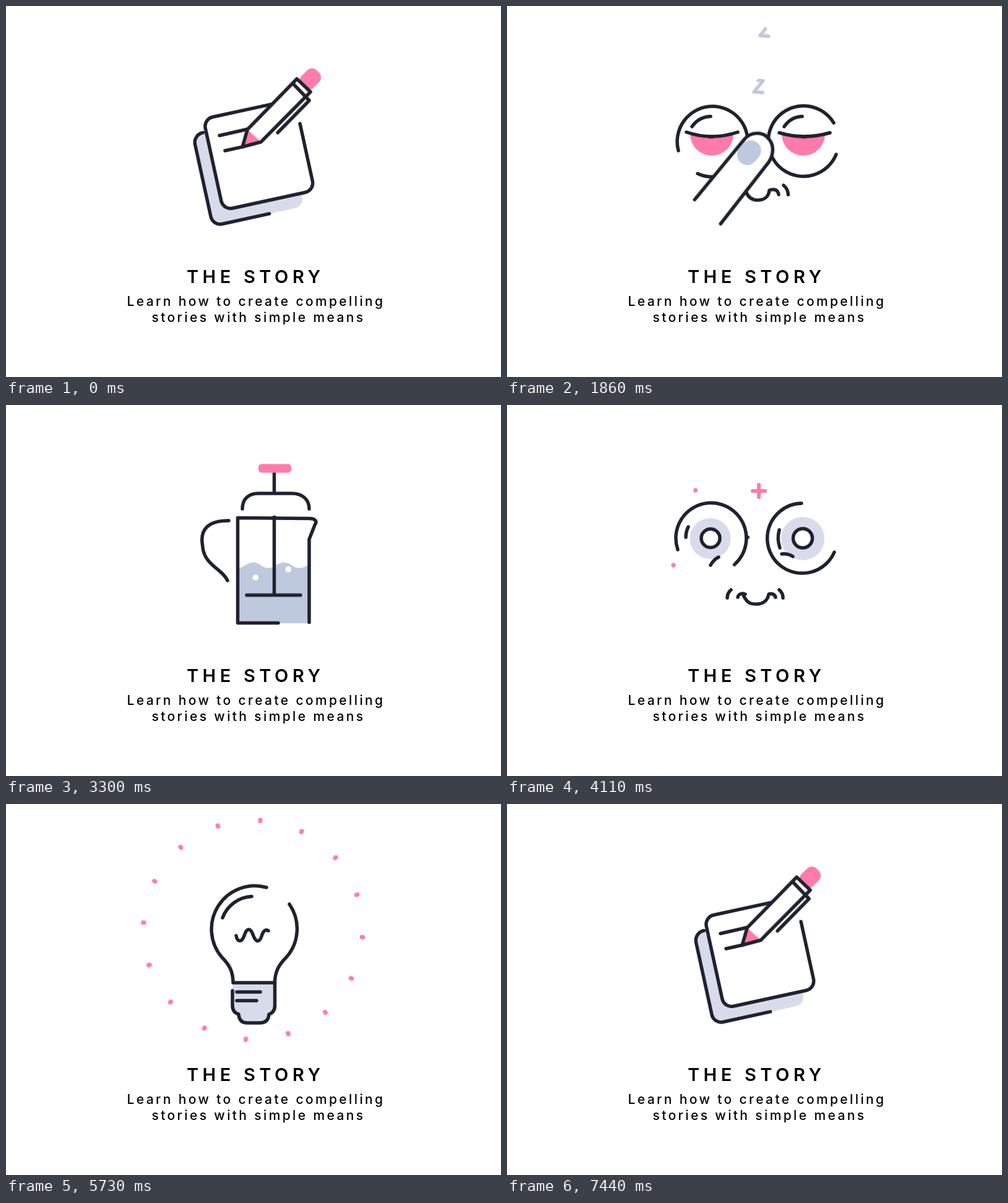
An HTML page for the animation above (7470 ms loop, 800 px wide and 600 px high).

```html
<!DOCTYPE html>
<html lang="en">
<head>
<meta charset="utf-8">
<title>The Story</title>
<style>
  html, body { margin: 0; width: 100%; height: 100%; overflow: hidden; background: #fff; }
  svg { display: block; width: 100%; height: 100%; }
  :root { --ink: #20222f; --pink: #ff7bac; --pale: #d8dcea; --blue: #bfc9de; }

  text { font-family: Inter, "Open Sans", sans-serif; text-anchor: middle; fill: #000; }
  .title { font-size: 29px; font-weight: 600; letter-spacing: 6.6px; }
  .sub { font-size: 21px; font-weight: 500; letter-spacing: 3.38px; }

  .line { fill: none; stroke: var(--ink); stroke-width: 5.5; stroke-linecap: round; stroke-linejoin: round; }
  .paper { fill: #fff; }
  .pink { fill: var(--pink); }
  .pale { fill: var(--pale); }
  .blue { fill: var(--blue); }
  .zed { stroke: var(--blue); }

  /* Every track lasts one loop; --at is the scene start, --d a local delay (ms). */
  .scene, .scene .a {
    animation: 7470ms linear infinite;
    animation-delay: calc((var(--at) + var(--d, 0) - 7470) * 1ms);
  }
  .scene { animation-timing-function: step-end; }
  #tired { --at: 480; animation-name: show-tired; }
  #press { --at: 2270; animation-name: show-press; }
  #awake { --at: 3854; animation-name: show-awake; }
  #bulb { --at: 4865; animation-name: show-bulb; }
  #pad { --at: 5985; animation-name: show-pad; }
  @keyframes show-tired { 0% { opacity: 1 } 23.96%, 100% { opacity: 0 } }
  @keyframes show-press { 0% { opacity: 1 } 21.2%, 100% { opacity: 0 } }
  @keyframes show-awake { 0% { opacity: 1 } 13.53%, 100% { opacity: 0 } }
  @keyframes show-bulb { 0% { opacity: 1 } 14.99%, 100% { opacity: 0 } }
  @keyframes show-pad { 0% { opacity: 1 } 26.31%, 100% { opacity: 0 } }

  /* Line trimming, on paths with pathLength 1 */
  .trim { stroke-dasharray: 1 2; }
  .scene .draw { animation-name: draw; }
  .scene .quick { animation-name: quick; }
  .scene .slow { animation-name: slow; }
  @keyframes draw { 0% { stroke-dashoffset: 1.01; animation-timing-function: ease-in-out } 5%, 100% { stroke-dashoffset: 0 } }
  @keyframes quick { 0% { stroke-dashoffset: 1.01; animation-timing-function: ease-in-out } 2.8%, 100% { stroke-dashoffset: 0 } }
  @keyframes slow { 0% { stroke-dashoffset: 1.01; animation-timing-function: ease-in-out } 8%, 100% { stroke-dashoffset: 0 } }

  .scene .zed { animation-name: zed; }
  @keyframes zed {
    0% { stroke-dashoffset: 1.01; animation-timing-function: ease-in-out }
    5%, 9% { stroke-dashoffset: 0 }
    14%, 100% { stroke-dashoffset: -1.01 }
  }
  .scene .drift { animation-name: drift; }
  @keyframes drift { 0% { transform: translateY(54.6px) } 23.96%, 100% { transform: translateY(-70.7px) } }

  .scene .finger { animation-name: rub; animation-timing-function: ease-in-out; }
  @keyframes rub {
    0%, 3%, 17%, 24%, 100% { transform: translate(-1.6px, 2.4px) }
    6.4% { transform: translate(-8px, 13px) }
    10.44%, 20% { transform: none }
    13.4% { transform: translate(-7px, 10px) }
  }

  .scene .tilt { animation-name: tilt; }
  @keyframes tilt {
    0% { transform: translate(385px, 296px) rotate(24deg); animation-timing-function: ease-out }
    2.95% { transform: translate(414.5px, 294.5px) rotate(22.5deg); animation-timing-function: ease-in-out }
    8%, 20.2% { transform: translate(432px, 267px) rotate(0deg); animation-timing-function: ease-in }
    21.2%, 100% { transform: translate(415px, 293px) rotate(21deg) }
  }
  .scene .plunge { animation-name: plunge; animation-timing-function: ease-in-out; }
  @keyframes plunge {
    0%, 3% { transform: none }
    9.5%, 11% { transform: translateY(-41px) }
    19%, 100% { transform: none }
  }
  .scene .bubbles { animation-name: bubbles; }
  @keyframes bubbles { 0% { transform: translateY(8px) } 21.2%, 100% { transform: translateY(-50px) } }
  .wave { animation: wave 747ms linear -498ms infinite; }
  @keyframes wave { to { transform: translateX(50px) } }

  .plus { stroke: var(--pink); stroke-width: 6; stroke-linecap: round; vector-effect: non-scaling-stroke; }
  .scene .plus { animation-name: pop; animation-timing-function: ease-out; }
  @keyframes pop {
    0% { transform: scale(.01); visibility: visible }
    3.5% { transform: scale(1); visibility: visible }
    4.2% { transform: scale(1); visibility: visible; animation-timing-function: ease-in }
    6%, 100% { transform: scale(.01); visibility: hidden }
  }

  .ray { stroke: var(--pink); stroke-width: 7; stroke-linecap: round; }
  .scene .ray { animation-name: ray; }
  @keyframes ray {
    0%, 1.3% { stroke-dashoffset: 1.01; transform: none; animation-timing-function: ease-out }
    4%, 4.8% { stroke-dashoffset: 0; transform: none; animation-timing-function: ease-in-out }
    13%, 100% { stroke-dashoffset: -1.01; transform: translateY(-64px) }
  }

  .scene .pencil { animation-name: write; }
  @keyframes write {
    0% { transform: translate(435px, 157px); animation-timing-function: ease-in-out }
    6.1%, 6.69% { transform: translate(347px, 208px) }
    11.38% { transform: translate(424px, 191px); animation-timing-function: ease-out }
    12.4% { transform: translate(412px, 182px); animation-timing-function: ease-in-out }
    14.28% { transform: translate(354px, 234px) }
    25.07%, 100% { transform: translate(408px, 222px) }
  }
  .scene .row1 { animation-name: row1; }
  .scene .row2 { animation-name: row2; }
  @keyframes row1 { 0%, 6.69% { stroke-dashoffset: 1.01 } 11.38%, 100% { stroke-dashoffset: 0 } }
  @keyframes row2 { 0%, 14.28% { stroke-dashoffset: 1.01 } 25.07%, 100% { stroke-dashoffset: 0 } }
</style>
</head>
<body>
<svg viewBox="0 0 800 600">
  <defs>
    <clipPath id="glass"><path d="M-57-84H57V85.5H-57Z"/></clipPath>
  </defs>

  <g id="tired" class="scene">
    <g class="a drift">
      <path class="line trim a zed" style="--d:524" d="M409 69L425 70L409 90L423 91"/>
      <path class="line trim a zed" style="--d:-23" d="M372 98L387 99L374 115L387 116"/>
      <path class="line trim a zed" style="--d:653" d="M398 162L414 163L399 181L413 182"/>
    </g>
    <path class="pink" d="M296 207Q331 214 366 207A35 35 0 0 1 296 207Z"/>
    <path class="pink" d="M444 207Q479 214 514 207A35 35 0 0 1 444 207Z"/>
    <path class="line trim a draw" d="M277 234A57 57 0 1 1 308 271"/>
    <path class="line trim a draw" d="M532 240A57 57 0 1 1 528 189"/>
    <path class="line" d="M290 204Q331 218 373 204M327 211.5h6M440 205Q480 217 522 205M477 211.5h6"/>
    <path class="line trim a quick" d="M299 195C306 185 317 179 329 178.5"/>
    <path class="line trim a quick" d="M448 195C455 185 465 179 477 178.5"/>
    <path class="line" d="M386 300C390 310 396 314 405 314C416 314 423 308 424 298C431 295 438 297 439 305M447 290Q454 296 454.5 305"/>
    <g class="a finger">
      <path class="line paper" d="M304 312L383 216C394 201 415 201 425 215C433 226 431 240 424 251L346 351"/>
      <rect class="blue" x="-16.5" y="-21" width="33" height="42" rx="16.5" transform="translate(392 236) rotate(40)"/>
    </g>
  </g>

  <g id="press" class="scene">
    <g class="a tilt">
      <g clip-path="url(#glass)">
        <path class="blue wave" d="M-149.5-8q12.5-9 25 0t25 0 25 0 25 0 25 0 25 0 25 0 25 0 25 0V90H-149.5Z"/>
        <g class="a bubbles" fill="#fff">
          <circle cx="-18" cy="-.6" r="4.8"/>
          <circle cx="-28.7" cy="41.7" r="4.8"/>
          <circle cx="24.2" cy="28.4" r="4.8"/>
        </g>
      </g>
      <g class="a plunge">
        <path class="line" d="M1.5-126V71M-43 71H44"/>
        <rect class="pink" x="-24" y="-141" width="53" height="14" rx="5"/>
      </g>
      <path class="paper" d="M-50-88V-99C-50-115-40-124-24-124H30C46-124 58-115 58-99V-88Z"/>
      <path class="line trim a quick" d="M-50-99C-50-115-40-124-24-124H30C46-124 58-115 58-99"/>
      <path class="line trim a quick" d="M8 85.5H-57.5V-84.5L58-83.5C68-83.5 71-78.5 67.5-74L58-50V84.5"/>
      <path class="line trim a draw" style="--d:25" d="M-74 17C-82-2-113-8-114.4-40C-119-66-105-80-72-80"/>
    </g>
  </g>

  <g id="awake" class="scene">
    <circle class="pale" cx="328.5" cy="216" r="33"/>
    <circle class="pale" cx="478" cy="216" r="35"/>
    <path class="line trim a draw" d="M276 234A57 57 0 1 1 308 268"/>
    <path class="line trim a draw" d="M529 238A56.5 56.5 0 1 1 527 189"/>
    <path class="line trim a quick" style="--d:238" d="M389 214Q404 202 420 214"/>
    <circle class="line paper" cx="329" cy="215.5" r="15"/>
    <circle class="line paper" cx="478" cy="215.5" r="15.5"/>
    <path class="line" d="M289 214Q289 205 293 197M440 202Q436 217 441 231M329 259Q334 250 342 246M444 241Q454 240 462 245"/>
    <path class="line trim a quick" d="M373 311C374 305 380 304 385 306C380 305 383 310 385 313C389 320 394 322 403 322C413 322 421 317 423 306C427 304 433 306 434 311"/>
    <path class="line" d="M356 312Q356 304 362 299M440 299Q446 304 446 312"/>
    <g transform="translate(407 139)"><path class="plus a" style="--d:-40" d="M-10 0H10M0-10V10"/></g>
    <g transform="translate(304.5 138)"><path class="plus a" style="--d:248" d="M-10 0H10M0-10V10"/></g>
    <g transform="translate(269 259)"><path class="plus a" style="--d:248" d="M-10 0H10M0-10V10"/></g>
    <g transform="translate(549 180)"><path class="plus a" style="--d:500" d="M-10 0H10M0-10V10"/></g>
  </g>

  <g id="bulb" class="scene">
    <g id="rays"></g>
    <path class="pale" d="M366 289H435V326Q435 337 425 340Q424 354 410 354H390Q377 354 376 340Q366 337 366 326Z"/>
    <path class="line trim a quick" d="M434.5 289V326Q434.5 337 425 340Q424 354 410 354H390Q377 354 376 340Q366 337 366 326V302"/>
    <path class="line paper trim a quick" d="M421 135A70 70 0 0 0 349 248C361 260 367 271 367 289H434.5C434.5 271 441 260 453 248A70 70 0 0 0 458 162"/>
    <path class="line trim a quick" d="M350 184A53 53 0 0 1 397 149.5"/>
    <path class="line trim a quick" d="M372 213C374 224 381 224 385 213C389 200 395 200 399 211C404 225 410 225 414 211C417 203 421 203 424 205"/>
    <path class="line" d="M373 304H411M373 318H405"/>
  </g>

  <g id="pad" class="scene">
    <g transform="translate(392 266) rotate(-12.3)">
      <rect class="pale" x="-75.5" y="-75.5" width="151" height="151" rx="15"/>
      <path class="line trim a slow" style="--d:30" d="M-59-75.5A16 16 0 0 0-75.5-60V60A15.5 15.5 0 0 0-60 75.5H18"/>
    </g>
    <g transform="translate(408.8 240.5) rotate(-12.3)">
      <rect class="paper" x="-75.5" y="-75.5" width="151" height="151" rx="15"/>
      <path class="line trim a draw" d="M75.5-35V60A15.5 15.5 0 0 1 60 75.5H-60A15.5 15.5 0 0 1-75.5 60V-60A15.5 15.5 0 0 1-60-75.5H36"/>
    </g>
    <path class="line trim a row1" d="M345 209.5L424 191.5"/>
    <path class="line trim a row2" d="M354 234L408 222"/>
    <g class="a pencil">
      <rect class="pink" x="138" y="-13.5" width="34.5" height="27" rx="11" transform="rotate(-45)"/>
      <path class="paper" d="M88-110L8-28L0 0L30-8L110-89Z"/>
      <path class="pink" d="M8-28L0 0L30-8Z"/>
      <path class="line" d="M88-110L8-28L0 0L30-8L110-89ZM81-103L108-75L57-23"/>
    </g>
  </g>

  <text class="title" x="403.4" y="448">THE STORY</text>
  <text class="sub" x="404" y="484.5">Learn how to create compelling</text>
  <text class="sub" x="408" y="510.5">stories with simple means</text>
</svg>
<script>
  const rays = document.getElementById('rays');
  for (let i = 0; i < 16; i++) {
    rays.innerHTML += `<g transform="translate(399.2 203.5) rotate(${3.8 + i * 22.5})">` +
      '<path class="ray trim a" d="M0-85.5V-118"/></g>';
  }
  document.querySelectorAll('.trim').forEach(p => p.setAttribute('pathLength', 1));
</script>
</body>
</html>
```
